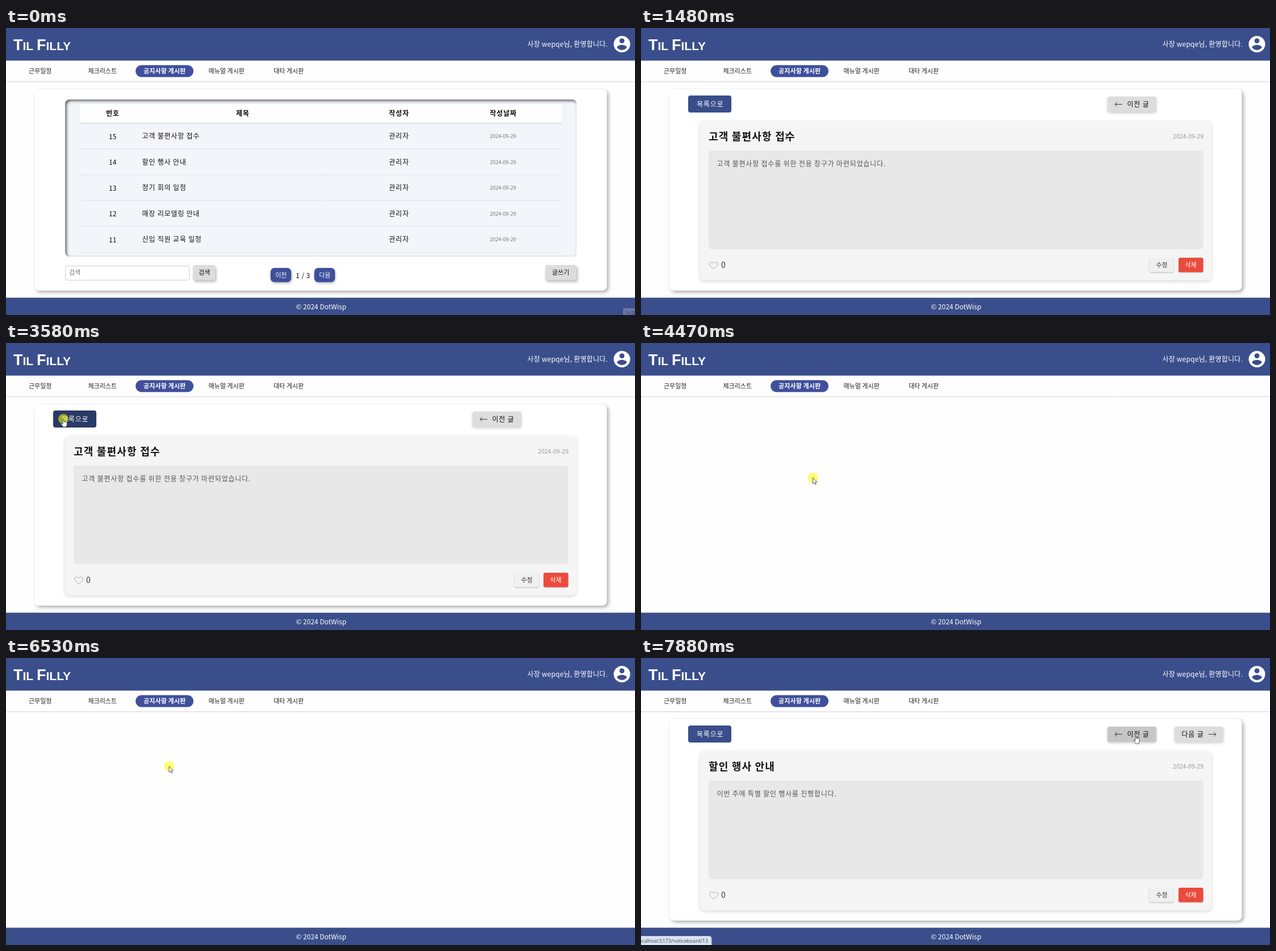
An HTML page with a canvas that plays this animation: 1107 px wide and 506 px high, repeating every 8 s.

```html
<!DOCTYPE html>
<html lang="ko">
<head>
<meta charset="utf-8">
<title>공지사항 게시판</title>
<style>
html, body { margin: 0; width: 100%; height: 100%; overflow: hidden; background: #fefefe; }
canvas { display: block; }
</style>
</head>
<body>
<canvas id="stage" width="1107" height="506"></canvas>
<script>
const ctx = document.getElementById('stage').getContext('2d');
const LOOP = 8000;
const SANS = '"Noto Sans CJK KR", "Noto Sans KR", "Noto Sans CJK", sans-serif';
const NAVY = '#3a4e8b', INDIGO = '#3f4f9b', INK = '#111';

const NOTICES = [
  [15, '고객 불편사항 접수'], [14, '할인 행사 안내'], [13, '정기 회의 일정'],
  [12, '매장 리모델링 안내'], [11, '신입 직원 교육 일정']
];
const POSTS = {
  15: { title: NOTICES[0][1], body: '고객 불편사항 접수를 위한 전용 창구가 마련되었습니다.', bodyEnd: 429, titleEnd: 271 },
  14: { title: NOTICES[1][1], body: '이번 주에 특별 할인 행사를 진행합니다.', bodyEnd: 343, titleEnd: 236, next: true }
};

// Page shown from each time on: a list, a blank page or a post number.
const PAGES = [
  [0, 'list'], [1350, 'blank'], [1480, 15], [3650, 'list'], [4340, 'blank'], [4540, 14],
  [5720, 'list'], [6390, 'blank'], [6600, 15], [7400, 14]
];
// Pointer stops: time, x, y.
const PATH = [
  [70, 1100, 495], [340, 194, 191], [480, 194, 191], [800, 710, 180], [1220, 256, 191],
  [1740, 256, 191], [2480, 724, 222], [2800, 929, 238], [3250, 40, 118], [3520, 101, 134],
  [3650, 101, 134], [4130, 302.5, 237.5], [5160, 302.5, 237.5], [5430, 168, 175],
  [5570, 112, 137], [5720, 112, 137], [5910, 165, 150], [6330, 287, 191], [6600, 287, 191],
  [6730, 937, 148], [6850, 925, 146], [7060, 882, 138], [7400, 882, 138], [7700, 871, 137]
];
const CLICKS = [[1250, 1480], [3500, 3760], [4260, 4540], [5590, 5800], [6320, 6600], [7190, 7400]];

const BACK = [83, 119, 76, 30], PREV = [821, 121, 86, 27], NEXT = [939, 121, 86, 27];
const rowY = i => 191 + i * 45.5;
const inside = (p, [x, y, w, h]) => p.x >= x && p.x <= x + w && p.y >= y && p.y <= y + h;

function box(x, y, w, h, r, fill, shadow, stroke) {
  ctx.save();
  ctx.beginPath();
  ctx.roundRect(x, y, w, h, r);
  if (shadow) [ctx.shadowOffsetX, ctx.shadowOffsetY, ctx.shadowBlur, ctx.shadowColor] = shadow;
  ctx.fillStyle = fill;
  ctx.fill();
  ctx.shadowColor = 'transparent';
  if (stroke) { ctx.strokeStyle = stroke; ctx.lineWidth = 1; ctx.stroke(); }
  ctx.restore();
}

// cy is the middle of the line of text.
function text(str, x, cy, { size = 12, color = INK, weight = 400, gap = 0, align = 'left', font = SANS } = {}) {
  ctx.font = `${weight} ${size}px ${font}`;
  ctx.letterSpacing = gap + 'px';
  ctx.textAlign = align;
  ctx.fillStyle = color;
  ctx.fillText(str, x, cy + size * 0.37);
}

function line(color, width, ...points) {
  ctx.beginPath();
  points.forEach(([x, y], i) => i ? ctx.lineTo(x, y) : ctx.moveTo(x, y));
  ctx.strokeStyle = color;
  ctx.lineWidth = width;
  ctx.stroke();
}

function logo() {
  ctx.letterSpacing = '0px';
  ctx.textAlign = 'left';
  ctx.fillStyle = '#fff';
  let x = 13;
  for (const [str, size] of [['T', 27], ['IL ', 21], ['F', 27], ['ILLY', 21]]) {
    ctx.font = `700 ${size}px "Liberation Sans", sans-serif`;
    ctx.fillText(str, x, 39);
    x += ctx.measureText(str).width;
  }
}

function avatar() {
  const disc = (x, y, rx, ry, fill) => {
    ctx.beginPath();
    ctx.ellipse(x, y, rx, ry, 0, 0, 7);
    ctx.fillStyle = fill;
    ctx.fill();
  };
  disc(1084, 28.5, 14.5, 14.5, '#fff');
  disc(1084, 22.7, 4.4, 4.4, NAVY);
  ctx.beginPath();
  ctx.moveTo(1075.3, 34.3);
  ctx.bezierCurveTo(1075.5, 31.4, 1081, 29.8, 1084, 29.8);
  ctx.bezierCurveTo(1087, 29.8, 1092.5, 31.4, 1092.7, 34.3);
  ctx.bezierCurveTo(1088.5, 40.4, 1079.5, 40.4, 1075.3, 34.3);
  ctx.fill();
}

function frame() {
  ctx.fillStyle = '#fefefe';
  ctx.fillRect(0, 0, 1107, 506);
  ctx.fillStyle = NAVY;
  ctx.fillRect(0, 0, 1107, 57.5);
  ctx.fillRect(0, 475.5, 1107, 30.5);
  line('#dcdcdc', 1, [0, 94.5], [1107, 94.5]);
  line('#f3f3f3', 1, [0, 95.5], [1107, 95.5]);
  logo();
  text('사장 wepqe님, 환영합니다.', 1059, 29, { color: '#fff', weight: 500, gap: 0.2, align: 'right' });
  avatar();
  box(228, 65.5, 102, 21, 10.5, INDIGO);
  const tabs = [['근무일정', 40], ['체크리스트', 144.5], ['공지사항 게시판', 242], ['매뉴얼 게시판', 356.5], ['대타 게시판', 471]];
  tabs.forEach(([s, x], i) => text(s, x, 75.5, i === 2
    ? { size: 11, color: '#fff', weight: 700, gap: 0.1 } : { size: 11, color: '#222' }));
  text('© 2024 DotWisp', 554.5, 492, { color: '#fff', weight: 500, align: 'center' });
}

function card() {
  box(50.5, 108, 1007, 355, 8, '#fff', [3, 3, 6, 'rgba(0,0,0,.32)']);
}

function insetPanel(x, y, w, h) {
  box(x, y, w, h, 8, '#f2f6fa');
  ctx.save();
  ctx.beginPath();
  ctx.roundRect(x, y, w, h, 8);
  ctx.clip();
  ctx.beginPath();
  ctx.rect(x - 30, y - 30, w + 60, h + 60);
  ctx.roundRect(x, y, w, h, 8);
  ctx.shadowOffsetX = ctx.shadowOffsetY = 2.5;
  ctx.shadowBlur = 5;
  ctx.shadowColor = 'rgba(0,0,0,.6)';
  ctx.fillStyle = '#888';
  ctx.fill('evenodd');
  ctx.restore();
}

const RAISED = [2, 3, 5, 'rgba(0,0,0,.28)'];

function list() {
  card();
  insetPanel(104, 126, 900, 277);
  ctx.fillStyle = '#fefefe';
  ctx.fillRect(130.5, 134, 847.5, 33.5);
  line('#d3d7db', 1.4, [130.5, 168], [978, 168]);
  for (const [s, x] of [['번호', 176], ['제목', 405], ['작성자', 674], ['작성날짜', 851.5]])
    text(s, x, 151, { weight: 700, gap: 0.8 });
  NOTICES.forEach(([no, title], i) => {
    const y = rowY(i);
    text(no, 181, y + 0.5);
    text(title, 239.5, y, { gap: 0.8 });
    text('관리자', 674, y, { gap: 0.8 });
    text('2024-09-29', 851.5, y, { size: 9, color: '#777' });
    line('#dde1e5', 1, [130.5, y + 22.5], [978, y + 22.5]);
  });
  box(104.5, 419.5, 218, 25, 3, '#fff', null, '#ccc');
  text('검색', 111, 431, { size: 11, color: '#757575' });
  box(329, 418, 39, 26.5, 3, '#dcdcdc', RAISED);
  text('검색', 339, 431, { size: 11 });
  box(949, 418, 55, 26.5, 3, '#dcdcdc', RAISED);
  text('글쓰기', 961, 431, { size: 11 });
  for (const [s, x] of [['이전', 465.5], ['다음', 542.5]]) {
    box(x, 423, 36.5, 25, 7, INDIGO, [1, 2, 4, 'rgba(0,0,0,.3)']);
    text(s, x + 8.5, 436, { size: 11, color: '#fff', weight: 500 });
  }
  text('1 / 3', 510, 437, { gap: 0.4 });
}

function arrowIcon(x, y, dir) {
  line('#333', 1, [x - 6.5, y], [x + 6.5, y]);
  line('#333', 1, [x + dir * 2.5, y - 3.8], [x + dir * 6.5, y], [x + dir * 2.5, y + 3.8]);
}

function heart(x, y) {
  ctx.beginPath();
  ctx.moveTo(x, y + 6.2);
  ctx.bezierCurveTo(x - 14, y - 3, x - 4, y - 10, x, y - 3.4);
  ctx.bezierCurveTo(x + 4, y - 10, x + 14, y - 3, x, y + 6.2);
  ctx.strokeStyle = '#aaa';
  ctx.lineWidth = 1;
  ctx.stroke();
}

function post(no, p) {
  const { title, body, next } = POSTS[no];
  const soft = [0, 2, 5, 'rgba(0,0,0,.2)'];
  card();
  box(...BACK, 4, inside(p, BACK) ? '#2a3a66' : NAVY);
  text('목록으로', 98, 134.5, { color: '#fff', gap: 0.8 });
  box(...PREV, 4, inside(p, PREV) ? '#c6c6c6' : '#dddddd', soft);
  arrowIcon(840.5, 134.5, -1);
  text('이전 글', 855.5, 134.5, { gap: 0.8 });
  if (next) {
    box(...NEXT, 4, inside(p, NEXT) ? '#c6c6c6' : '#dddddd', soft);
    text('다음 글', 951.5, 134.5, { gap: 0.8 });
    arrowIcon(1005.5, 134.5, 1);
  }
  box(104, 164, 900, 281, 8, '#f5f5f5', [0, 2, 6, 'rgba(0,0,0,.16)']);
  text(title, 119, 191, { size: 18, weight: 700, gap: 1.2 });
  text('2024-09-29', 990, 191, { size: 10.5, color: '#999', align: 'right' });
  box(119, 216, 870.5, 174, 5, '#e8e8e8');
  text(body, 133.5, 240, { color: '#555', gap: 0.8 });
  heart(128, 418.5);
  text('0', 141, 418, { size: 14, color: '#333' });
  box(894.5, 405, 43.5, 25.5, 3, '#f0f0f0', [0, 1, 2, 'rgba(0,0,0,.25)']);
  text('수정', 906.5, 417.5, { size: 11, color: '#333' });
  box(946, 405, 43.5, 25.5, 3, '#e94b3c', [0, 1, 2, 'rgba(0,0,0,.2)']);
  text('삭제', 957.5, 417.5, { size: 11, color: '#fff' });
}

function statusBar(no) {
  box(-6, 490.5, 130, 20, 4, '#d8e4f6', null, '#b9c6dc');
  text('localhost:5173/noticeboard/' + no, 118, 498.5,
    { size: 8.7, color: '#444', align: 'right', font: '"Open Sans", sans-serif' });
}

function pointerAt(t) {
  let i = PATH.findIndex(k => k[0] > t);
  if (i < 0) i = PATH.length;
  const a = PATH[Math.max(i - 1, 0)], b = PATH[Math.min(i, PATH.length - 1)];
  const k = b[0] > a[0] ? (t - a[0]) / (b[0] - a[0]) : 0;
  const e = k * k * (3 - 2 * k);
  return { x: a[1] + (b[1] - a[1]) * e, y: a[2] + (b[2] - a[2]) * e };
}

function pointerKind(page, p) {
  if (page === 'blank') return 'arrow';
  if (page === 'list') {
    const overRow = NOTICES.some((_, i) => Math.abs(p.y - rowY(i)) < 9);
    const overText = [[178, 198], [238, 345], [673, 710]].some(([a, b]) => p.x > a && p.x < b);
    return overRow && overText ? 'beam' : 'arrow';
  }
  const { titleEnd, bodyEnd, next } = POSTS[page];
  if ([BACK, PREV, ...(next ? [NEXT] : [])].some(b => inside(p, b))) return 'hand';
  const texts = [[119, 180, titleEnd - 119, 22], [134, 231, bodyEnd - 134, 18]];
  return texts.some(b => inside(p, b)) ? 'beam' : 'arrow';
}

const ARROW = new Path2D('M0 0V10.5L2.5 8.3L4.2 12L5.8 11.3L4.2 7.7H7.3Z');
const HAND = new Path2D('M-1 1Q0 -.6 1 1V5Q2 4 3 5.2Q4.2 4.4 5 5.6Q6.4 5.2 6.4 7V10L5 14H-.5L-3.6 9.4Q-4.2 7.4 -2.4 7.8L-1 9Z');

function pointer(kind, { x, y }) {
  if (kind === 'beam') {
    for (const side of [-1, 1]) line('#444', 1, [x - 2.5, y + side * 4.5], [x + 2.5, y + side * 4.5]);
    line('#444', 1, [x, y - 4.5], [x, y + 4.5]);
    return;
  }
  const shape = kind === 'hand' ? HAND : ARROW;
  ctx.save();
  ctx.translate(x, y);
  ctx.fillStyle = '#fff';
  ctx.strokeStyle = '#333';
  ctx.lineWidth = 0.8;
  ctx.fill(shape);
  ctx.stroke(shape);
  ctx.restore();
}

function draw(now) {
  const t = now % LOOP;
  const page = PAGES.filter(k => k[0] <= t).pop()[1];
  const p = pointerAt(t);
  frame();
  if (page === 'list') list();
  else if (page !== 'blank') post(page, p);

  if (t < 70) {
    ctx.fillStyle = '#6a76a5';
    ctx.fillRect(1086, 494, 21, 12);
    text('녹화', 1091, 503, { size: 9, color: '#3d4878' });
  }
  if (t >= 7200) statusBar(page - 1);
  if (t >= 70) {
    if (CLICKS.some(([a, b]) => t >= a && t < b)) {
      ctx.beginPath();
      ctx.arc(p.x, p.y, 9, 0, 7);
      ctx.fillStyle = 'rgba(255,255,0,.56)';
      ctx.fill();
    }
    pointer(pointerKind(page, p), p);
  }
  requestAnimationFrame(tick);
}

const start = performance.now();
function tick() { draw(performance.now() - start); }
tick();
</script>
</body>
</html>
```
